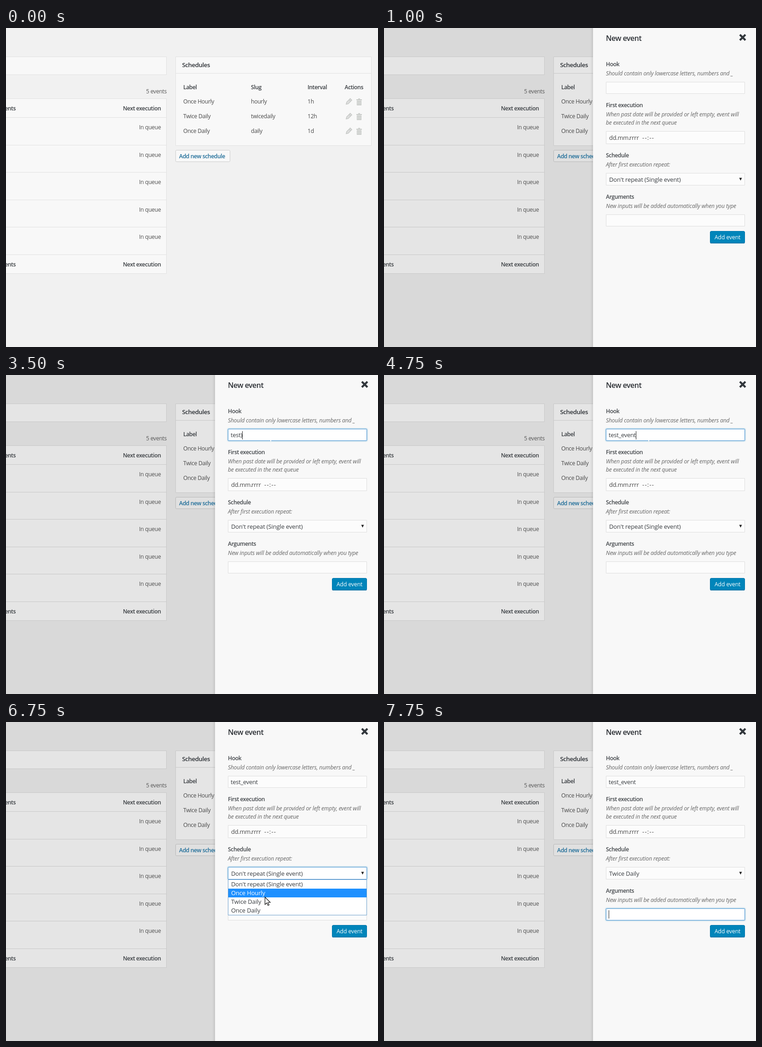
An HTML page with a canvas that plays this animation: 808 by 693 pixels, repeating every 8000 ms.

```html
<!DOCTYPE html>
<html lang="en">
<head>
<meta charset="utf-8">
<title>New event panel</title>
<style>
html, body { margin: 0; width: 100%; height: 100%; overflow: hidden; background: #f1f1f1; }
canvas { display: block; }
</style>
</head>
<body>
<canvas id="stage" width="808" height="693"></canvas>
<script>
const ctx = document.getElementById('stage').getContext('2d');
const LOOP = 8000, STEP = 250;
const FAMILY = '"Open Sans", "Noto Sans", sans-serif';

// font prefix, size, letter spacing
const STYLES = {
  body: ['400', 12.2, -0.33],
  bold: ['600', 12.2, -0.42],
  head: ['600', 13.2, -0.4],
  title: ['600', 16, -0.5],
  hint: ['italic 400', 12.2, -0.16],
  option: ['400', 13, -0.15],
  input: ['400', 13, -0.3],
  button: ['400', 12.2, -0.1],
  time: ['400', 13, 1.2]
};

// page shades before, during and after the panel slides in
const SHADES = [
  { page: '#f1f1f1', box: '#f8f8f8', line: '#e1e1e1', button: '#f8f8f8', edge: '#cccccc' },
  { page: '#e1e1e1', box: '#eeeeee', line: '#cecece', button: '#ebebeb', edge: '#c0c0c0' },
  { page: '#d9d9d9', box: '#e5e5e5', line: '#c8c8c8', button: '#e0e0e0', edge: '#b8b8b8' }
];
const OPTIONS = ["Don't repeat (Single event)", 'Once Hourly', 'Twice Daily', 'Once Daily'];

const TYPED = [[2750, 't'], [3000, 'te'], [3250, 'test'], [3500, 'test)'],
  [4000, 'test'], [4250, 'test_e'], [4500, 'test_eve'], [4750, 'test_event']];
const FOCUS = [[2250, 'hook'], [5000, 'date'], [6000, 'select'], [7500, ''], [7750, 'args']];
const POINTER = [[1500, [306, 152]], [1750, [450, 150]], [2000, [569, 130]],
  [2250, [574, 133, 'text']], [2750, null], [5000, [574, 230]], [5500, [572, 270]],
  [5750, [570, 308]], [6000, [567, 328]], [6500, [564, 350]], [6750, [562, 380]],
  [7000, [561, 392]], [7500, [568, 410]], [7750, null]];

function at(list, t, start) {
  let value = start;
  for (const [time, v] of list) if (t >= time) value = v;
  return value;
}

function rect(x, y, w, h, color) {
  ctx.fillStyle = color;
  ctx.fillRect(x, y, w, h);
}

function frame(x, y, w, h, fill, stroke, radius = 0) {
  ctx.beginPath();
  ctx.roundRect(x + 0.5, y + 0.5, w - 1, h - 1, radius);
  ctx.fillStyle = fill;
  ctx.fill();
  ctx.strokeStyle = stroke;
  ctx.lineWidth = 1;
  ctx.stroke();
}

function setFont(style) {
  const [face, size, spacing] = STYLES[style];
  ctx.font = `${face} ${size}px ${FAMILY}`;
  ctx.letterSpacing = spacing + 'px';
}

function text(str, x, y, style = 'body', color = '#484848', align = 'left') {
  setFont(style);
  ctx.textAlign = align;
  ctx.fillStyle = color;
  ctx.fillText(str, x, y);
}

function pencil(x, y) {
  ctx.save();
  ctx.translate(x, y);
  ctx.rotate(Math.PI / 4);
  ctx.strokeStyle = '#c3c6c3';
  ctx.lineWidth = 1.3;
  ctx.fillStyle = '#dedede';
  ctx.beginPath();
  ctx.moveTo(-2.5, -7);
  ctx.lineTo(2.5, -7);
  ctx.lineTo(2.5, 4);
  ctx.lineTo(0, 8);
  ctx.lineTo(-2.5, 4);
  ctx.closePath();
  ctx.fill();
  ctx.stroke();
  rect(-2.5, -4, 5, 1.2, '#c3c6c3');
  ctx.restore();
}

function bin(x, y) {
  const color = '#c3c6c3';
  rect(x - 2, y - 8, 4, 1.5, color);
  rect(x - 6, y - 6, 12, 2, color);
  rect(x - 5, y - 3, 10, 10, color);
  for (let i = -1; i <= 1; i++) rect(x - 0.5 + i * 3, y - 2, 1, 8, '#f4f4f4');
}

function drawPage(level) {
  const c = SHADES[level];
  rect(0, 0, 808, 693, c.page);

  frame(-2, 62, 351, 40, c.box, c.line);
  text('5 events', 349, 142, 'body', '#555', 'right');

  frame(-2, 153, 351, 381, c.box, c.line);
  for (const y of [179, 518]) {
    text('Arguments', 21, y, 'bold', '#3a3e42', 'right');
    text('Next execution', 336.5, y, 'bold', '#3a3e42', 'right');
  }
  for (let i = 0; i < 6; i++) rect(0, Math.round(194 + i * 59.6), 348, 1, c.line);
  for (let i = 0; i < 5; i++) text('In queue', 336.5, Math.round(220 + i * 59.6), 'body', '#505050', 'right');

  frame(368, 62, 426, 194, c.box, c.line);
  rect(368, 98, 425, 1, c.line);
  text('Schedules', 382.5, 85, 'head', '#2c3035');

  const cols = [385, 532, 655, 735.5];
  ['Label', 'Slug', 'Interval', 'Actions'].forEach((s, i) => text(s, cols[i], 133, 'bold', '#3a3e42'));
  const rows = [['Once Hourly', 'hourly', '1h'], ['Twice Daily', 'twicedaily', '12h'], ['Once Daily', 'daily', '1d']];
  rows.forEach((row, r) => {
    const y = 164 + r * 32;
    row.forEach((s, i) => text(s, cols[i], y));
    pencil(744.5, y - 4);
    bin(767, y - 3);
  });

  frame(368, 265, 119, 26, c.button, c.edge, 2);
  text('Add new schedule', 376, 283, 'bold', '#1d6c98');
}

function drawSheet(x) {
  const shade = ctx.createLinearGradient(x - 6, 0, x, 0);
  shade.addColorStop(0, 'rgba(0,0,0,0)');
  shade.addColorStop(1, 'rgba(0,0,0,0.09)');
  rect(x - 6, 0, 6, 693, shade);
  rect(x, 0, 808 - x, 693, '#f8f8f8');
}

function drawPlaceholders() {
  drawSheet(677);
  for (const y of [8, 73, 120.5, 167, 214, 261]) rect(706, y, 102, 28, '#d5d5d5');
}

function field(y, h, focused) {
  if (focused) {
    ctx.save();
    ctx.shadowColor = 'rgba(30,140,190,0.8)';
    ctx.shadowBlur = 3;
    rect(482, y, 302, h, '#fff');
    ctx.restore();
  }
  frame(482, y, 302, h, focused ? '#fff' : '#fcfcfc', focused ? '#5b9dd9' : '#dedede');
}

function caret(x, y) {
  rect(Math.round(x), y, 1, 18, '#222');
}

function drawForm(t) {
  const focus = at(FOCUS, t, '');
  const typed = at(TYPED, t, '');
  const label = (s, y) => text(s, 482, y, 'bold', '#42464a');
  const hint = (s, y) => text(s, 482, y, 'hint', '#666');

  drawSheet(454);
  text('New event', 482, 28, 'title', '#2c3035');
  ctx.strokeStyle = '#32373c';
  ctx.lineWidth = 4.4;
  ctx.beginPath();
  ctx.moveTo(773, 14.5);
  ctx.lineTo(785, 26.5);
  ctx.moveTo(785, 14.5);
  ctx.lineTo(773, 26.5);
  ctx.stroke();

  label('Hook', 83);
  hint('Should contain only lowercase letters, numbers and _', 103);
  field(117, 26, focus === 'hook');
  text(typed, 488, 135, 'input', '#383c40');
  if (focus === 'hook') {
    setFont('input');
    caret(488 + ctx.measureText(typed).width, 122);
    if (t >= 2750) rect(574, 142, 2, 2, '#fff');
  }

  label('First execution', 172);
  hint('When past date will be provided or left empty, event will', 192);
  hint('be executed in the next queue', 210);
  field(224, 28, focus === 'date');
  text('dd.mm.', 489, 243, 'input', '#444');
  text('rrrr', 533, 243, 'option', '#444');
  text('--:--', 561, 243, 'time', '#444');

  label('Schedule', 281);
  hint('After first execution repeat:', 301);
  field(315, 27, focus === 'select');
  text(OPTIONS[t < 7250 ? 0 : 2], 489, 334, 'option', '#383c40');
  ctx.fillStyle = '#222';
  ctx.beginPath();
  ctx.moveTo(771.5, 325.5);
  ctx.lineTo(777.5, 325.5);
  ctx.lineTo(774.5, 331.5);
  ctx.fill();

  label('Arguments', 371);
  hint('New inputs will be added automatically when you type', 391);
  field(405, 26, focus === 'args');
  if (focus === 'args') caret(488, 409);

  frame(708, 441, 76, 27, '#0085ba', '#0073aa', 2.5);
  rect(709, 467, 74, 1, '#006799');
  text('Add event', 718, 459, 'button', '#fff');

  if (t >= 6000 && t < 7250) drawOptions(t < 6750 ? 0 : t < 7000 ? 1 : 2);
}

function drawOptions(active) {
  frame(482, 342, 302, 78, '#fff', '#6c9fcb');
  OPTIONS.forEach((s, i) => {
    if (i === active) rect(483, 343 + i * 19, 300, 19, '#1e90ff');
    text(s, 489, 357 + i * 19, 'option', i === active ? '#fff' : '#383c40');
  });
}

function drawPointer(t) {
  const p = at(POINTER, t, null);
  if (!p) return;
  const [x, y, kind] = p;
  if (kind === 'text') {
    rect(x, y - 8, 1, 16, '#222');
    rect(x - 3, y - 8, 7, 1, '#222');
    rect(x - 3, y + 8, 7, 1, '#222');
    return;
  }
  const shape = [[0, 0], [0, 16], [4, 12.5], [6.5, 18], [9, 17], [6.5, 11.5], [11.5, 11.5]];
  ctx.beginPath();
  shape.forEach(([dx, dy]) => ctx.lineTo(x + 0.5 + dx, y + 0.5 + dy));
  ctx.closePath();
  ctx.fillStyle = '#fff';
  ctx.fill();
  ctx.strokeStyle = '#111';
  ctx.lineWidth = 1.2;
  ctx.stroke();
}

function draw(now) {
  const t = Math.floor((now % LOOP) / STEP) * STEP;
  const level = t < 750 ? 0 : t < 1000 ? 1 : 2;
  drawPage(level);
  if (level === 1) drawPlaceholders();
  if (level === 2) drawForm(t);
  drawPointer(t);
}

const start = performance.now();
function tick() {
  draw(performance.now() - start);
  requestAnimationFrame(tick);
}
tick();
</script>
</body>
</html>
```
